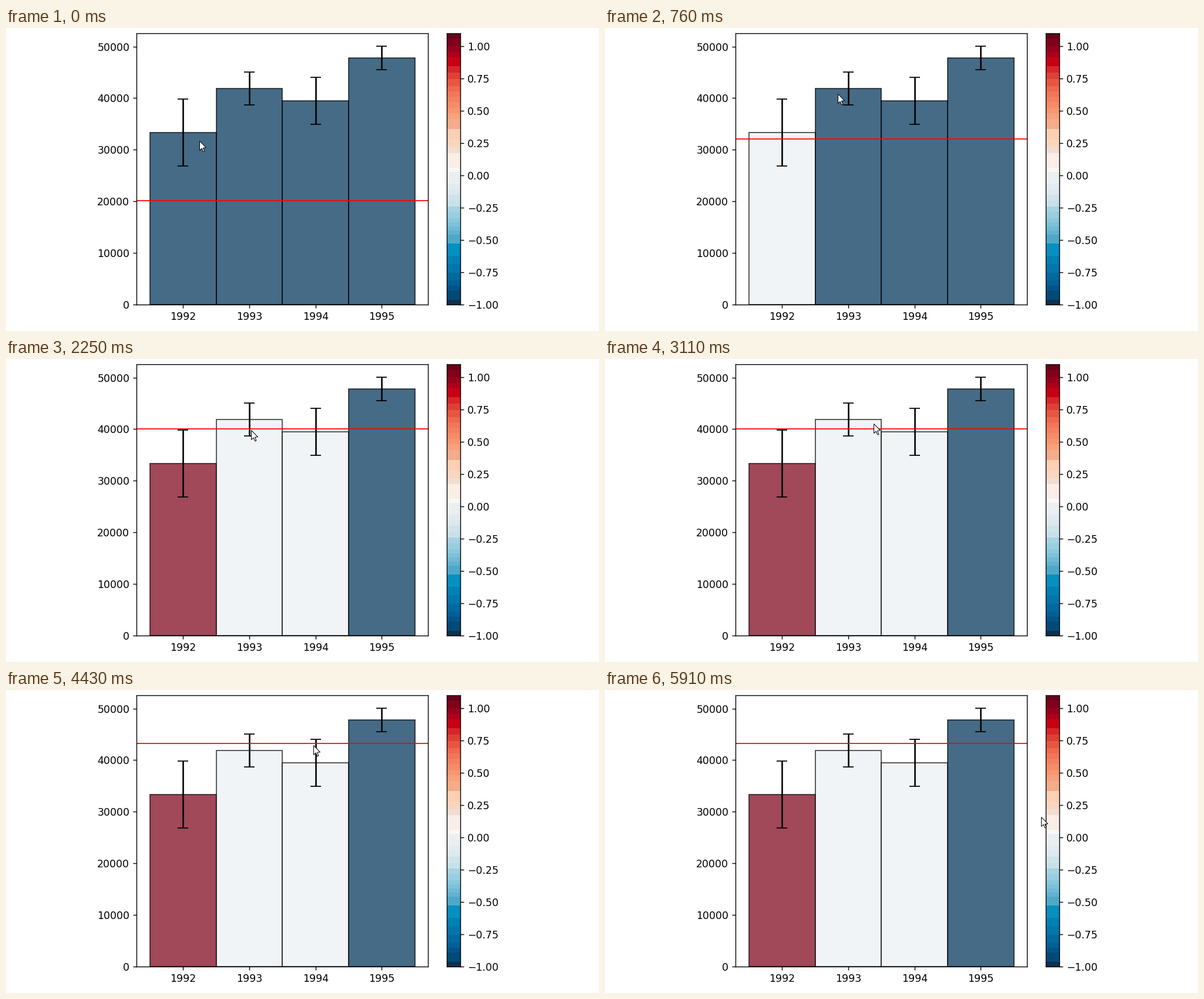
A matplotlib script that plays this animation: 1009x516 px, repeating every 5980 ms.

```python
import numpy as np
import matplotlib.pyplot as plt
from matplotlib.animation import FuncAnimation
from matplotlib.colors import ListedColormap
from matplotlib.patches import Polygon
from matplotlib.transforms import IdentityTransform

W, H, DPI = 1009, 516, 125
LOOP, STEP = 5980, 20

plt.rcParams.update({"font.family": "DejaVu Sans", "font.size": 10})

YEARS = [1992, 1993, 1994, 1995]
MEANS = [33312, 41862, 39493, 47744]
ERRORS = [6509, 3192, 4554, 2264]

BLUE, PALE, RED = "#003459", "#ecf1f3", "#7f041b"

# time, threshold, bar colours
STATES = [
    (0, 20100, [BLUE, BLUE, BLUE, BLUE]),
    (40, 32060, [PALE, BLUE, BLUE, BLUE]),
    (2250, 40030, [RED, PALE, PALE, BLUE]),
    (4430, 43200, [RED, PALE, PALE, BLUE]),
]

# first step, last step, number of steps, waypoints of the pointer tip
MOVES = [
    (0, 0, 1, [(330, 192)]),
    (520, 1090, 8, [(338, 182), (385, 125), (428, 81), (411, 109)]),
    (1150, 1390, 4, [(412, 112), (418, 121)]),
    (2940, 3410, 7, [(424, 119), (475, 106), (529, 94)]),
    (3630, 3720, 2, [(526, 94), (524, 94)]),
    (5130, 5130, 1, [(541, 105)]),
    (5190, 5430, 4, [(610, 180), (725, 305), (940, 500), (1030, 560)]),
    (5660, 5910, 4, [(853, 402), (790, 300), (756, 238), (743, 216)]),
]

BAND_TOPS = [
    9.5, 18, 31, 41, 50, 65, 76, 87, 99, 108, 117, 126, 136, 145, 155, 172,
    190, 203, 213, 238, 245, 265, 274, 284, 294, 304, 314, 324, 331, 338,
    345, 352, 367, 388, 402, 417, 430, 439, 447, 463,
]
BAND_COLORS = """
    69001a 81001b 97001c ae001b c80015 d7262a de4036 e85641 ee694e f27659
    f48060 f68b68 f7966f f8a17c f4ac8a fdd0b3 fad6bf f0ded2 faeee7 f9f8f7
    eceff1 e2ebf0 dde9ef cfe4ea c8e1e9 a5d3e2 97cee0 8ac8dd 7cc2d9 6fbad5
    62b2d0 50a8c9 0690c1 0081b6 0076ac 00699f 006097 00548a 004a78 10304f
""".split()

ARROW = np.array([
    (0, 0), (0, 16), (3.6, 12.6), (6.2, 18.4), (8.4, 17.4), (5.9, 11.7),
    (11, 11.3),
])


def pixel_axes(left, top, right, bottom):
    return fig.add_axes([left / W, 1 - bottom / H,
                         (right - left) / W, (bottom - top) / H])


def pointer_track():
    """Expand the moves into (time, x, y) steps."""
    track = []
    for start, end, count, points in MOVES:
        pts = np.array(points, float)
        u = np.linspace(0, len(pts) - 1, count)
        knots = np.arange(len(pts))
        xs = np.interp(u, knots, pts[:, 0])
        ys = np.interp(u, knots, pts[:, 1])
        track += zip(np.linspace(start, end, count), xs, ys)
    return track


# the small excess keeps the pixel size from rounding down
fig = plt.figure(figsize=((W + 0.01) / DPI, (H + 0.01) / DPI), dpi=DPI,
                 facecolor="white")

ax = pixel_axes(222.4, 9.5, 718.3, 471)
bars = ax.bar(YEARS, MEANS, width=1, yerr=ERRORS, capsize=5, alpha=0.73,
              color=BLUE, edgecolor="black", linewidth=1)
line = ax.axhline(STATES[0][1], color="red", linewidth=1)
ax.set_xlim(1991.3, 1995.7)
ax.set_ylim(0, 52508)
ax.set_xticks(YEARS)

cax = pixel_axes(749.5, 9.5, 772.5, 471)
edges = np.interp(BAND_TOPS + [471], [9.5, 471], [1.1, -1])
cmap = ListedColormap(["#" + c for c in BAND_COLORS])
cax.pcolormesh([0, 1], edges, np.arange(len(BAND_COLORS))[:, None],
               cmap=cmap, shading="flat")
cax.set_xlim(0, 1)
cax.set_ylim(-1, 1.1)
cax.set_xticks([])
cax.yaxis.tick_right()
ticks = np.arange(-1, 1.01, 0.25)
cax.set_yticks(ticks, [f"{v:.2f}".replace("-", "\u2212") for v in ticks])

pointer = Polygon(ARROW, closed=True, facecolor="white", edgecolor="black",
                  linewidth=72 / DPI, joinstyle="miter", snap=False,
                  transform=IdentityTransform(), zorder=10)
fig.add_artist(pointer)

TRACK = pointer_track()


def latest(rows, t):
    return [row for row in rows if row[0] <= t][-1]


def update(i):
    t = i * STEP + STEP / 2
    _, level, colors = latest(STATES, t)
    line.set_ydata([level, level])
    for bar, color in zip(bars, colors):
        bar.set_facecolor(color)
    _, x, y = latest(TRACK, t)
    tip = np.array([round(x) - 0.5, H - round(y) - 0.5])
    pointer.set_xy(tip + ARROW * [1, -1])
    return [line, pointer, *bars]


anim = FuncAnimation(fig, update, frames=LOOP // STEP, interval=STEP,
                     repeat=True, repeat_delay=0, blit=False)
plt.show()
```
